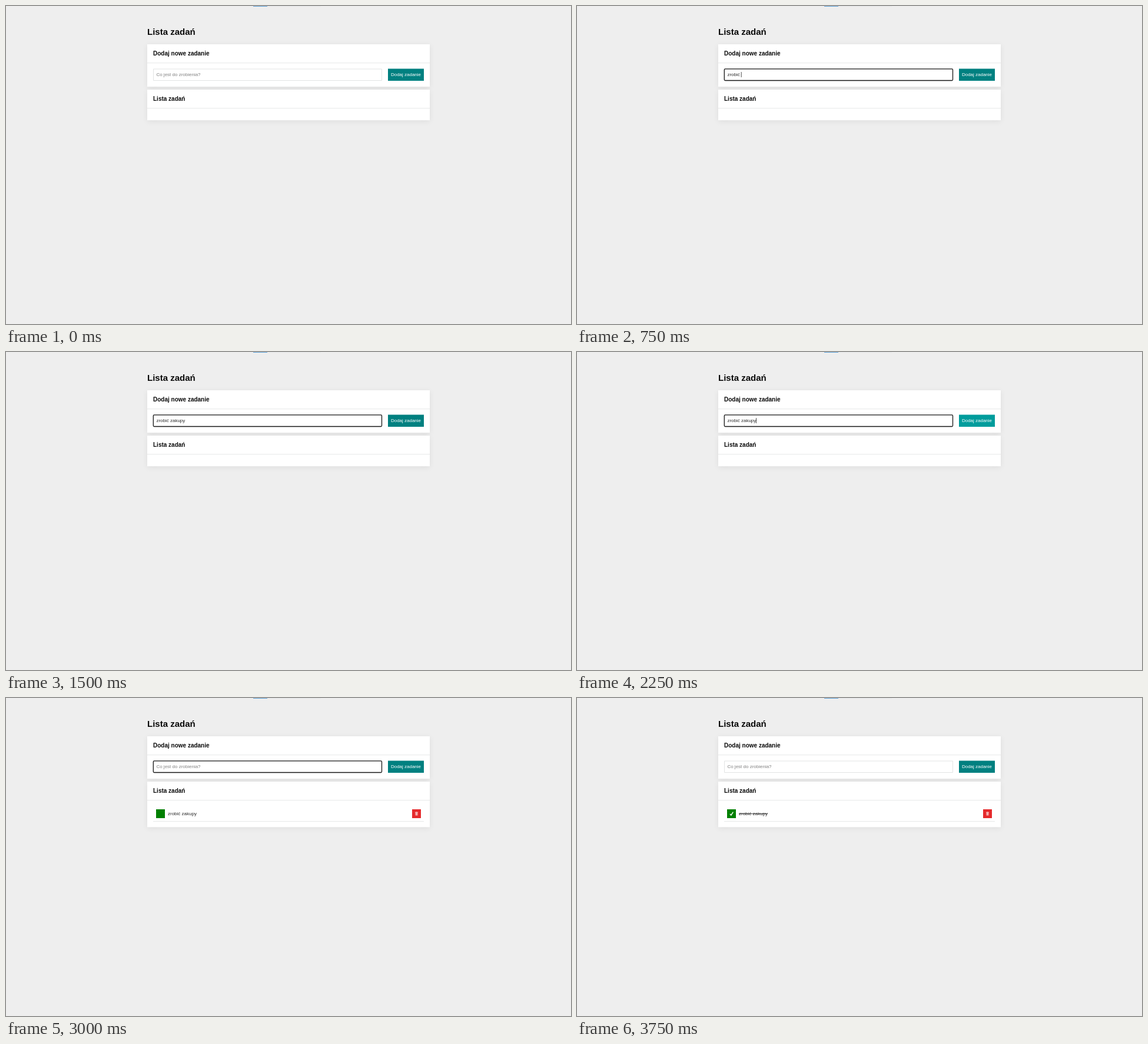
Animation of 960 by 540 pixels, one loop 4.5 s. Source, as an HTML page with a canvas:

```html
<!DOCTYPE html>
<html lang="pl">
<head>
<meta charset="utf-8">
<style>
  html, body { margin: 0; width: 100%; height: 100%; overflow: hidden; background: #eee; }
  canvas { display: block; }
</style>
</head>
<body>
<canvas id="stage" width="960" height="540"></canvas>
<script>
const ctx = document.getElementById('stage').getContext('2d');
const STEP = 750;
const TASK = 'zrobić zakupy';

const steps = [
  {},
  { focus: true, typed: 'zrobić ', caret: true },
  { focus: true, typed: TASK },
  { focus: true, typed: TASK, caret: true, hover: true },
  { focus: true, item: true },
  { item: true, done: true }
];

function rect(x, y, w, h, color) {
  ctx.fillStyle = color;
  ctx.fillRect(x, y, w, h);
}

function text(str, x, y, size, color, weight = 'normal') {
  ctx.font = `${weight} ${size}px "Liberation Sans", Arial, sans-serif`;
  ctx.fillStyle = color;
  ctx.fillText(str, x, y);
  return ctx.measureText(str).width;
}

function card(title, y, height) {
  ctx.save();
  ctx.shadowColor = 'rgba(0,0,0,0.07)';
  ctx.shadowBlur = 10;
  ctx.shadowOffsetY = 2;
  rect(240, y, 480, height, '#fff');
  ctx.restore();
  text(title, 250, y + 18.7, 10, '#0a0a0a', 'bold');
  rect(240, y + 31.2, 480, 1, '#e6e8e8');
}

function inputField({ focus, typed, caret }) {
  ctx.beginPath();
  if (focus) {
    ctx.roundRect(250.3, 106.9, 388.2, 19.6, 1.5);
    ctx.strokeStyle = '#161616';
    ctx.lineWidth = 1.3;
  } else {
    ctx.rect(250.5, 107, 388, 19.5);
    ctx.strokeStyle = '#e2e4e4';
    ctx.lineWidth = 1;
  }
  ctx.stroke();
  const width = typed
    ? text(typed, 255.4, 119, 8, '#2a2a2a')
    : (text('Co jest do zrobienia?', 255.4, 119, 8, '#808080'), 0);
  if (caret) rect(255.2 + width, 112, 0.8, 9, '#222');
}

function checkMark() {
  ctx.beginPath();
  ctx.moveTo(260, 197);
  ctx.lineTo(261.8, 199);
  ctx.lineTo(265.3, 193.7);
  ctx.strokeStyle = '#fff';
  ctx.lineWidth = 1.4;
  ctx.stroke();
}

function trashIcon() {
  rect(695, 193.8, 5, 0.9, '#fbdada');
  rect(696.6, 193.2, 1.8, 0.7, '#f6b9b9');
  rect(695.5, 195, 4, 4.4, '#f8caca');
  rect(696.6, 195.6, 0.4, 3.2, '#e52b2b');
  rect(698, 195.6, 0.4, 3.2, '#e52b2b');
}

function taskRow(done) {
  rect(255, 189, 15, 15, '#008000');
  const width = text(TASK, 275, 199, 8, '#2a2a2a');
  if (done) {
    checkMark();
    rect(275, 196, width, 0.8, '#333');
  }
  rect(690, 189, 15, 15, '#e52a2c');
  trashIcon();
  rect(250, 209, 460, 1, '#e6e8e8');
}

function draw(state) {
  rect(0, 0, 960, 540, '#eee');
  rect(420, 0, 24, 1, '#5b9fd6');
  rect(444, 0, 91, 1, '#e6e7e8');
  text('Lista zadań', 240, 48.6, 15, '#0a0a0a', 'bold');

  card('Dodaj nowe zadanie', 65, 72);
  inputField(state);
  rect(649, 106.5, 61, 20.5, state.hover ? '#009c9c' : '#008080');
  text('Dodaj zadanie', 653.9, 119, 8, '#fff');

  card('Lista zadań', 142, state.item ? 77.3 : 52);
  if (state.item) taskRow(state.done);
}

const start = performance.now();
function tick() {
  const elapsed = performance.now() - start;
  draw(steps[Math.floor(elapsed / STEP) % steps.length]);
  requestAnimationFrame(tick);
}
tick();
</script>
</body>
</html>
```
